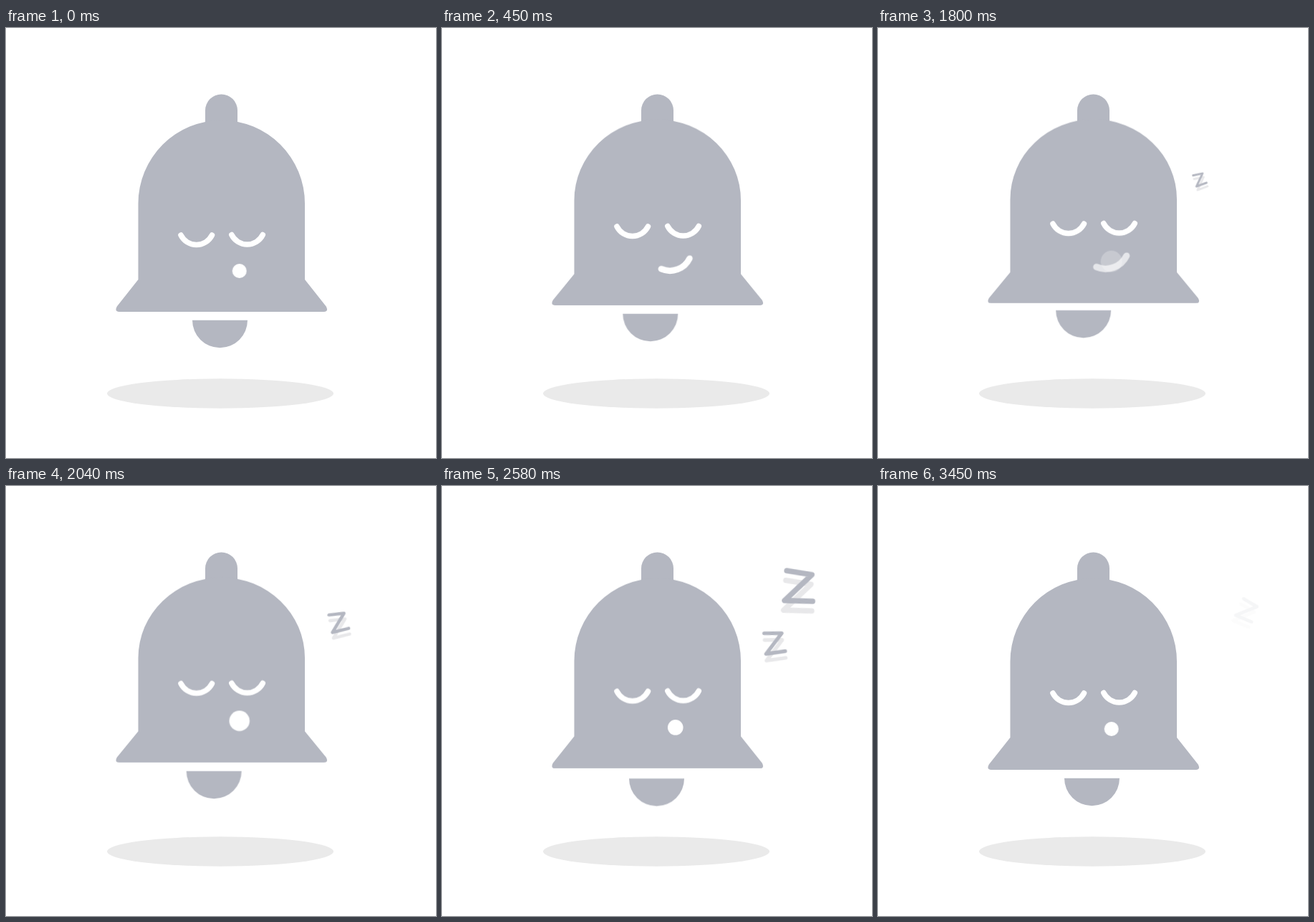
An HTML page for the animation above (3630 ms loop, 600 px wide and 600 px high).

```html
<!DOCTYPE html>
<html lang="en">
<head>
<meta charset="utf-8">
<title>Sleeping bell</title>
<style>
  html, body { margin: 0; height: 100%; overflow: hidden; background: #fff; }
  svg { display: block; width: 100vw; height: 100vh; }

  .bell { fill: #b4b7c1; }
  .line { fill: none; stroke: #fff; stroke-linecap: round; stroke-width: 7.5; }
  .hole { fill: #fff; }
  .z use { fill: none; stroke: #b4b7c1; stroke-width: 7.5;
    stroke-linecap: round; stroke-linejoin: round; }
  .z use:first-child { stroke: #e8e8ea; }

  .breath, .clapper, .smile, .hole, .z {
    animation: 3630ms linear infinite;
  }
  .breath  { animation-name: breathe; }
  .body    { --up: scaleY(.9605); transform-origin: 0 92px; }
  .eyes    { --up: translateY(-16px); }
  .mouth   { --up: translateY(-13.5px); }
  .pucker  { --up: scale(1.5); }
  .clapper { animation-name: swing; }
  .smile   { animation-name: smile; }
  .hole    { animation-name: hole; }
  .z1      { animation-name: drift1; }
  .z2      { animation-name: drift2; }

  /* Each element supplies its inhaled pose in --up */
  @keyframes breathe {
    0%, .83% { transform: none; animation-timing-function: cubic-bezier(.37, 0, .63, 1); }
    18.18%, 47.93% { transform: var(--up); animation-timing-function: cubic-bezier(.37, 0, .63, 1); }
    79.34%, 100% { transform: none; }
  }
  @keyframes swing {
    0%, .83% { transform: translate(0, 0); animation-timing-function: cubic-bezier(.37, 0, .63, 1); }
    20.44%, 47.93% { transform: translate(-12px, -14px); animation-timing-function: cubic-bezier(.37, 0, .63, 1); }
    71.07% { transform: translate(1px, .4px); animation-timing-function: ease-in-out; }
    78.51%, 100% { transform: translate(0, 0); }
  }
  @keyframes smile {
    0%, 1.65% { opacity: 0; transform: scale(.9); }
    4.96% { opacity: 1; transform: scale(.91); }
    12.4% { opacity: 1; transform: scale(.94); }
    27.27%, 48.76% { opacity: 1; transform: scale(1); }
    51.24%, 100% { opacity: 0; transform: scale(1); }
  }
  @keyframes hole {
    0%, 1.65% { opacity: 1; }
    4.96%, 48.76% { opacity: 0; }
    52.07%, 100% { opacity: 1; }
  }
  @keyframes drift1 {
    0%, 49.5% { opacity: 0; transform: translate(448.5px, 211.5px) rotate(-16deg) scale(.38); }
    49.51% { opacity: 1; transform: translate(448.5px, 211.5px) rotate(-16deg) scale(.38); }
    61.98% { opacity: 1; transform: translate(477px, 171px) rotate(-5deg) scale(.78); }
    71.07% { opacity: 1; transform: translate(498px, 140px) rotate(5.5deg) scale(1); }
    76.86% { opacity: 1; transform: translate(511px, 121.5px) rotate(11.2deg) scale(1); }
    81.82% { opacity: .28; transform: translate(522.5px, 107px) rotate(16deg) scale(.92); }
    83.47%, 100% { opacity: 0; transform: translate(526px, 102px) rotate(18deg) scale(.86); }
  }
  @keyframes drift2 {
    0%, 61.9% { opacity: 0; transform: translate(444px, 238px) rotate(-14deg) scale(.36); }
    61.91% { opacity: 1; transform: translate(444px, 238px) rotate(-14deg) scale(.36); }
    71.07% { opacity: 1; transform: translate(463.5px, 218.5px) rotate(-4deg) scale(.69); }
    81.82% { opacity: 1; transform: translate(486px, 195.5px) rotate(11deg) scale(.96); }
    84.3% { opacity: 1; transform: translate(491.5px, 191px) rotate(14deg) scale(.98); }
    88.43% { opacity: .8; transform: translate(500.5px, 184.5px) rotate(19deg) scale(.84); }
    95.04%, 100% { opacity: .14; transform: translate(515px, 173.5px) rotate(27deg) scale(.61); }
  }
</style>
</head>
<body>
<svg viewBox="0 0 600 600">
  <defs>
    <path id="z" d="M-19 -20 L16.4 -17.7 L-18 21.8 L21 19"/>
  </defs>

  <ellipse cx="299" cy="510" rx="158" ry="20.7" fill="#eaeaea"/>

  <g class="bell">
    <path class="clapper" d="M260 407.7 H337 A38.5 38.5 0 0 1 260 407.7 Z"/>
    <path d="M278 150 V115 A22.5 22.5 0 0 1 323 115 V150 Z"/>
    <path class="breath body" d="M184.5 351 V245 A116.25 116.25 0 0 1 417 245 V351
      L446.7 388.5 Q450.5 396 443.5 396 H158 Q151 396 154.8 388.5 Z"/>
  </g>

  <g class="breath eyes">
    <path class="line" d="M244 289 A24.3 24.3 0 0 0 287.5 289"/>
    <path class="line" d="M314.8 288.5 A24.3 24.3 0 0 0 358.3 288.5"/>
  </g>

  <g class="breath mouth">
    <g transform="translate(325.7 339)">
      <g class="breath pucker"><circle class="hole" r="10"/></g>
      <path class="line smile" style="stroke-width:9.2" d="M-21 7.75 A32.4 32.4 0 0 0 21 -7.75"/>
    </g>
  </g>

  <g class="z z1"><use href="#z" y="13.5"/><use href="#z"/></g>
  <g class="z z2"><use href="#z" y="13.5"/><use href="#z"/></g>
</svg>
</body>
</html>
```
